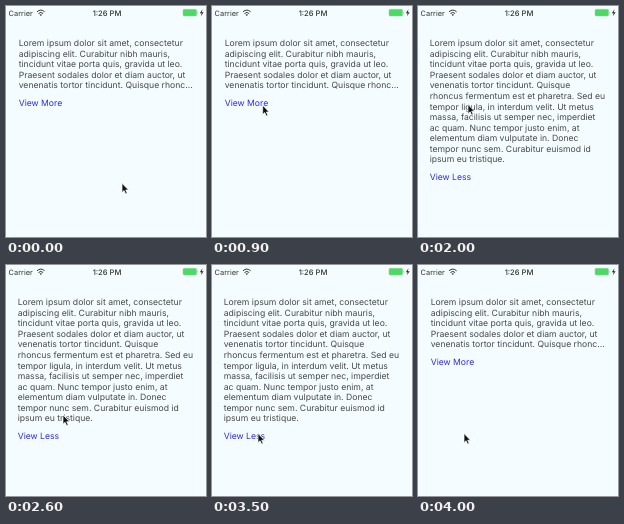
These frames come from a looping animation (200x231 px, 4.2 s). An HTML page:

```html
<!DOCTYPE html>
<html lang="en">
<head>
<meta charset="utf-8">
<title>View more</title>
<style>
  html, body { margin: 0; width: 100%; height: 100%; overflow: hidden; background: #f5fcff; }
  svg { display: block; width: 100%; height: 100%; }
  text { font-family: Inter, Roboto, sans-serif; font-size: 8.65px; fill: #46484a; white-space: pre; text-rendering: geometricPrecision; }
  .bar text { font-size: 7.4px; fill: #333; }
  .bar .time { font-weight: 500; font-size: 7.6px; }
  .link { fill: #2c2ce4; }
</style>
</head>
<body>
<svg viewBox="0 0 200 231">
  <rect width="200" height="231" fill="#f5fcff"/>
  <g class="bar">
    <text x="2.6" y="9.6">Carrier</text>
    <g fill="none" stroke="#333" stroke-width="1">
      <path d="M31 5.8Q34.8 2.4 38.6 5.8"/>
      <path d="M32.5 7.5Q34.8 5.4 37.1 7.5"/>
    </g>
    <path d="M33.5 8.7Q34.8 7.6 36.1 8.7L34.8 10.1Z" fill="#333"/>
    <text class="time" x="101" y="9.6" text-anchor="middle">1:26 PM</text>
    <rect x="177" y="3.3" width="13.6" height="6.8" rx="1.3" fill="#4cd964" stroke="#8fd49b" stroke-width=".5"/>
    <path d="M191.2 5.4Q192.6 6.7 191.2 8Z" fill="#6fb57c"/>
    <path d="M196.5 3.3L193.8 7.2H195.6L194.9 10.2L197.7 6.2H195.9Z" fill="#333"/>
  </g>
  <g id="short"></g>
  <g id="full"></g>
  <path id="cursor" d="M0 0V9.2L2.1 7.3L3.6 10.6L5.2 9.9L3.7 6.7H6.5Z"
    fill="#111" stroke="#fff" stroke-width=".7" stroke-linejoin="round"/>
</svg>
<script>
const LOOP = 4200, STEP = 100, OPEN = 1600, CLOSE = 3700;
const $ = id => document.getElementById(id);

const intro = [
  'Lorem ipsum dolor sit amet, consectetur',
  'adipiscing elit. Curabitur nibh mauris,',
  'tincidunt vitae porta quis, gravida ut leo.',
  'Praesent sodales dolor et diam auctor, ut'
];
const shortLines = [...intro, 'venenatis tortor tincidunt. Quisque rhonc...'];
const fullLines = [
  ...intro,
  'venenatis tortor tincidunt. Quisque',
  'rhoncus fermentum est et pharetra. Sed eu',
  'tempor ligula, in interdum velit. Ut metus',
  'massa, facilisis ut semper nec, imperdiet',
  'ac quam. Nunc tempor justo enim, at',
  'elementum diam vulputate in. Donec',
  'tempor nunc sem. Curabitur euismod id',
  'ipsum eu tristique.'
];

const easeIn = u => u * u;
const easeOut = u => 1 - (1 - u) ** 2;

// The cursor glides to each point in turn and rests there.
const home = { x: 116, y: 177.3 };
const moves = [
  { start: 0, end: 1000, x: 50, y: 98.5, ease: easeOut },
  { start: 2000, end: 2600, x: 57, y: 150, ease: easeIn },
  { start: 2600, end: 3300, x: 46, y: 168.5, ease: easeOut }
];

function cursorAt(t) {
  let { x, y } = home;
  for (const m of moves) {
    const u = Math.min(1, Math.max(0, (t - m.start) / (m.end - m.start)));
    const k = m.ease(u);
    x += (m.x - x) * k;
    y += (m.y - y) * k;
  }
  return [x, y];
}

function addText(parent, x, y, content, name = '') {
  const t = document.createElementNS('http://www.w3.org/2000/svg', 'text');
  t.setAttribute('x', x);
  t.setAttribute('y', y);
  t.setAttribute('class', name);
  t.textContent = content;
  parent.append(t);
}

function addBlock(id, x, lines, link) {
  const lineY = i => 40.2 + i * 10.57;
  lines.forEach((line, i) => addText($(id), x, lineY(i), line));
  addText($(id), x, lineY(lines.length) + 6.5, link, 'link');
}

function draw(ms) {
  const t = Math.floor((ms % LOOP) / STEP) * STEP;
  const open = t >= OPEN && t < CLOSE;
  $('short').style.display = open ? 'none' : '';
  $('full').style.display = open ? '' : 'none';
  $('cursor').setAttribute('transform', `translate(${cursorAt(t)})`);
}

addBlock('short', 12.7, shortLines, 'View More');
addBlock('full', 11.7, fullLines, 'View Less');

const start = performance.now();
function tick() {
  draw(performance.now() - start);
  requestAnimationFrame(tick);
}
tick();
</script>
</body>
</html>
```
